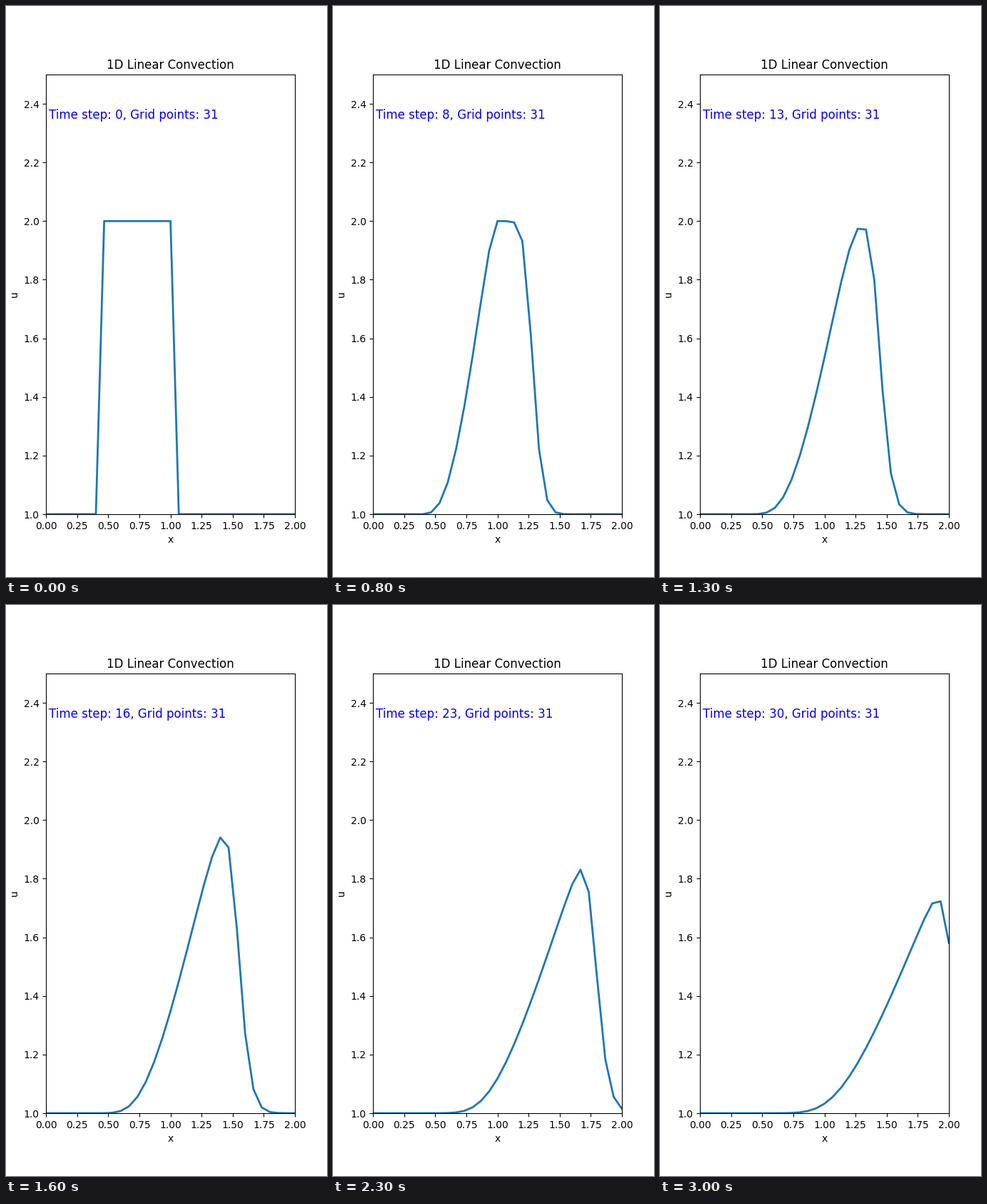
A matplotlib script that plays this animation: 450 px wide and 800 px high, repeating every 3100 ms.

```python
import numpy as np
import matplotlib.pyplot as plt
from matplotlib.animation import FuncAnimation

POINTS = 31
STEPS = 31
DT = 0.025
DX = 2 / (POINTS - 1)


def solve():
    """Upwind solution of u_t + u u_x = 0, one row per time step."""
    u = np.ones(POINTS)
    u[7:16] = 2  # square pulse between x = 0.5 and x = 1
    rows = [u]
    for _ in range(STEPS - 1):
        u = u.copy()
        u[1:] -= u[1:] * DT / DX * np.diff(u)
        rows.append(u)
    return rows


x = np.linspace(0, 2, POINTS)
history = solve()

fig, ax = plt.subplots(figsize=(4.5, 8), dpi=100)
ax.set(xlim=(0, 2), ylim=(1, 2.5), xlabel="x", ylabel="u",
       title="1D Linear Convection")
line, = ax.plot(x, history[0], lw=2)
label = ax.text(0.02, 2.35, "", fontsize=12, color="blue")


def update(step):
    line.set_ydata(history[step])
    label.set_text(f"Time step: {step}, Grid points: {POINTS}")
    return line, label


anim = FuncAnimation(fig, update, frames=STEPS, interval=100,
                     repeat=True, repeat_delay=0, blit=False)
plt.show()
```
